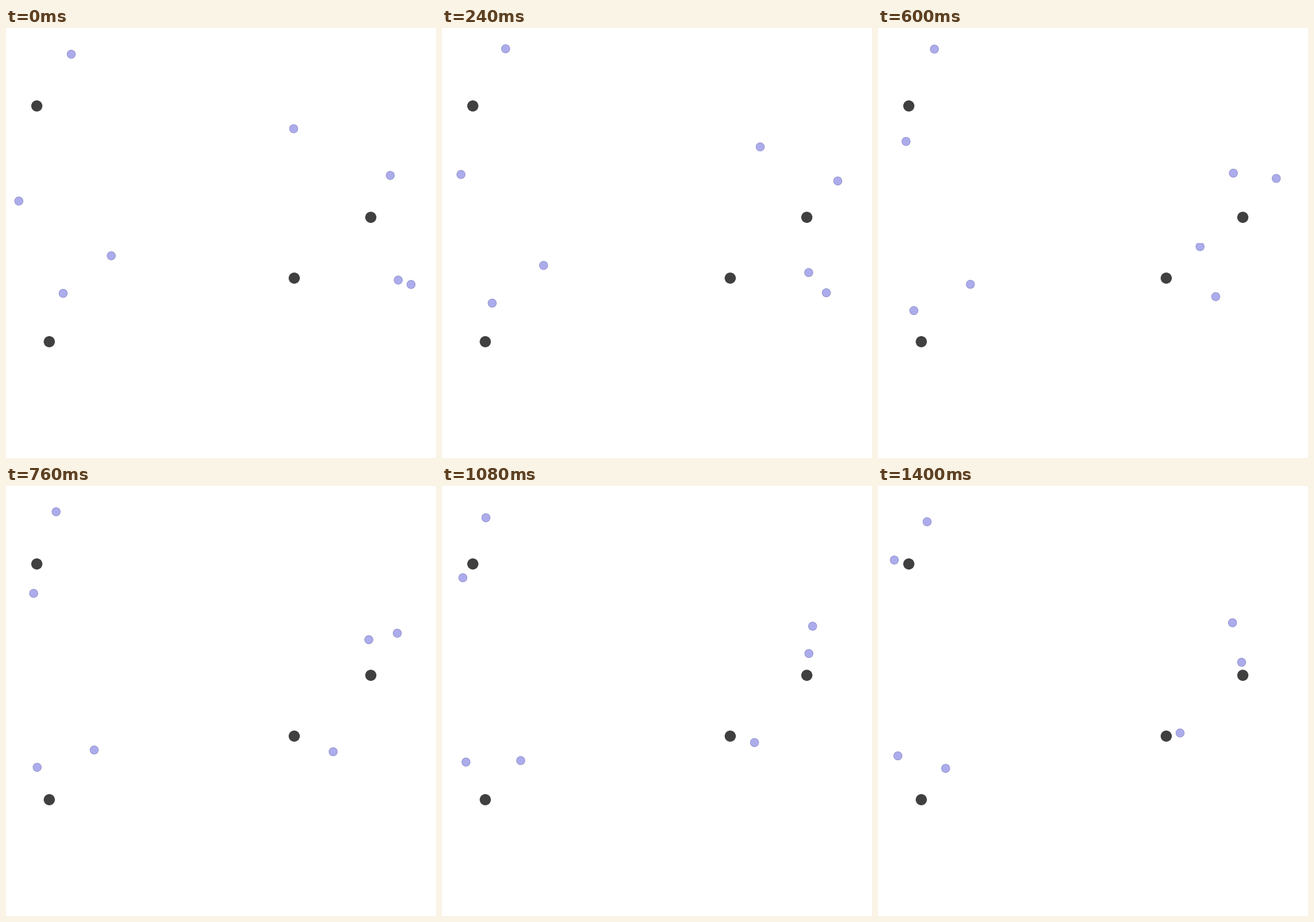
Animation of 748x748 px, one loop 1.44 s. Source, as a matplotlib script:

```python
import numpy as np
import matplotlib.pyplot as plt
from matplotlib.animation import FuncAnimation
from matplotlib.patches import Circle, Rectangle

SIZE, DPI = 748, 100
HALF = SIZE / 2
FRAMES, INTERVAL = 36, 40

# Times (in frames) at which the waypoints of every path are reached.
KNOTS = np.array([0, 6, 11, 15, 19, 27, 35], float)

TARGETS = [(53.6, 135.6), (634.6, 329.3), (75.3, 545.7), (501.4, 435.1)]

# Waypoints of each particle, grouped by panel: column, row, x, y.
PATHS = [
    (0, 0, [113.5, 110.7, 106.2, 98.1, 87.2, 76.4, 85.4],
           [45.6, 36.1, 32.7, 36.7, 44.8, 55.2, 62.2]),
    (0, 0, [22.3, 33.0, 43.4, 48.8, 48.1, 36.3, 28.4],
           [301.0, 254.8, 213.9, 197.3, 186.8, 159.6, 128.8]),
    (1, 0, [500.4, 553.5, 596.8, 618.2, 631.1, 638.2, 632.5],
           [175.2, 206.8, 234.1, 252.5, 267.3, 291.4, 306.6]),
    (1, 0, [668.4, 688.4, 697.3, 692.8, 680.7, 644.7, 616.7],
           [256.4, 266.1, 265.6, 261.7, 256.1, 243.9, 237.9]),
    (0, 1, [183.1, 176.7, 167.7, 160.7, 153.4, 136.9, 117.7],
           [396.2, 413.0, 431.4, 445.9, 459.2, 477.6, 491.2]),
    (0, 1, [99.4, 87.3, 73.2, 62.3, 54.2, 41.7, 34.6],
           [461.6, 478.6, 489.8, 491.6, 489.3, 480.2, 469.4]),
    (1, 1, [682.3, 637.9, 589.2, 560.2, 535.0, 500.0, 490.0],
           [438.5, 425.4, 401.4, 380.3, 358.0, 325.0, 305.0]),
    (1, 1, [704.6, 668.6, 619.7, 587.5, 569.1, 543.6, 525.5],
           [446.1, 460.6, 468.8, 467.3, 462.2, 446.3, 429.6]),
]


def spline(t, p, times):
    """Cubic spline: no curvature at the start, at rest at the end."""
    n, h = len(t), np.diff(t)
    d = np.diff(p) / h
    a, b = np.eye(n), np.zeros(n)
    a[0, :2] = 2, 1
    b[0] = 3 * d[0]
    for i in range(1, n - 1):
        a[i, i - 1:i + 2] = h[i], 2 * (h[i - 1] + h[i]), h[i - 1]
        b[i] = 3 * (h[i] * d[i - 1] + h[i - 1] * d[i])
    v = np.linalg.solve(a, b)

    k = np.clip(np.searchsorted(t, times, side="right") - 1, 0, n - 2)
    s = (times - t[k]) / h[k]
    return ((1 + 2 * s) * (1 - s) ** 2 * p[k] + s * (1 - s) ** 2 * h[k] * v[k]
            + s * s * (3 - 2 * s) * p[k + 1] - s * s * (1 - s) * h[k] * v[k + 1])


fig = plt.figure(figsize=(SIZE / DPI, SIZE / DPI), dpi=DPI, facecolor="white")
ax = fig.add_axes([0, 0, 1, 1])
ax.set_xlim(0, SIZE)
ax.set_ylim(SIZE, 0)
ax.axis("off")

for center in TARGETS:
    ax.add_patch(Circle(center, 9.7, facecolor="#404040", edgecolor="none"))

steps = np.arange(FRAMES, dtype=float)
dots, tracks = [], []
for col, row, xs, ys in PATHS:
    dot = Circle((xs[0], ys[0]), 7.2, facecolor="#acacec",
                 edgecolor="#9090cc", linewidth=0.7, zorder=3)
    ax.add_patch(dot)
    panel = Rectangle((col * HALF, row * HALF), HALF, HALF,
                      transform=ax.transData)
    dot.set_clip_path(panel)
    dots.append(dot)
    tracks.append(np.column_stack([spline(KNOTS, np.array(c), steps)
                                   for c in (xs, ys)]))


def update(i):
    for dot, track in zip(dots, tracks):
        dot.center = tuple(track[i])
    return dots


anim = FuncAnimation(fig, update, frames=FRAMES, interval=INTERVAL,
                     repeat=True, repeat_delay=0, blit=False)
plt.show()
```
